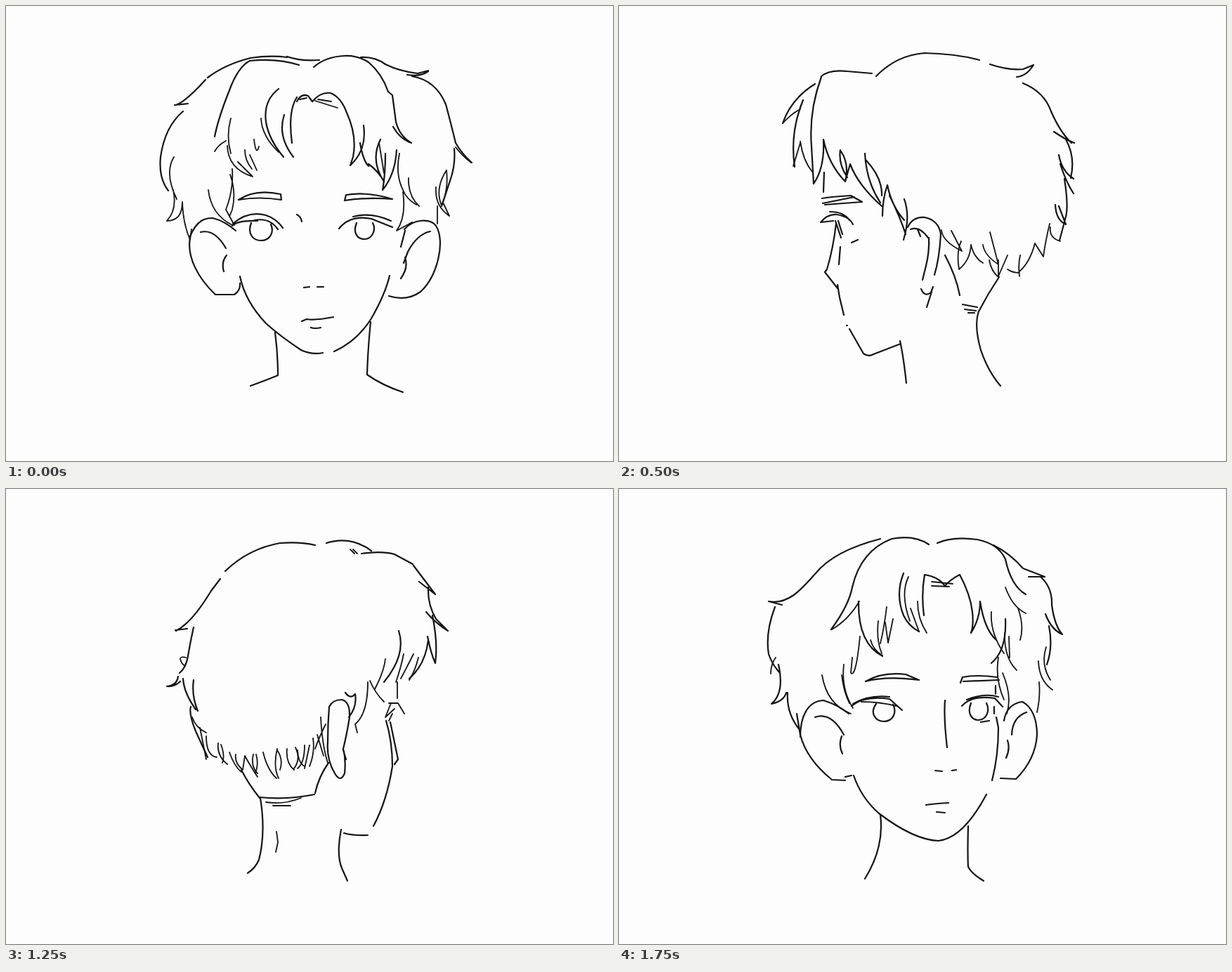
Recreate the animation shown at these times as an HTML page without scripts. Size 864 px wide and 648 px high, loop 1.83 s.

```html
<!DOCTYPE html>
<html lang="en">
<head>
<meta charset="utf-8">
<title>Head turn</title>
<style>
html, body { margin: 0; width: 100%; height: 100%; overflow: hidden; background: #fdfdfd; }
svg { display: block; width: 100vw; height: 100vh; }
path { fill: none; stroke: #141414; stroke-width: 2.2; stroke-linecap: round; stroke-linejoin: round; }
.thin { stroke-width: 1.8; }
.reel > g { visibility: hidden; animation: pose 1830ms step-end calc(var(--t) * 1ms) infinite; }
.reel > g:nth-child(3n) { animation-name: long-pose; }
@keyframes pose { 0% { visibility: visible } 4.3715%, 100% { visibility: hidden } }
@keyframes long-pose { 0% { visibility: visible } 4.918%, 100% { visibility: hidden } }
.flip { transform: translate(862px, 0) scale(-1, 1); }
.flip-back { transform: translate(894px, 0) scale(-1, 1); }
</style>
</head>
<body>
<svg viewBox="0 0 864 648">
<defs>
<g id="front">
  <!-- hair, locks, ears, features, jaw and neck -->
  <path d="M242 141Q256 136 284 105M240 141L259 139M287 102Q312 83 348 74Q376 70 400 73M297 186Q302 160 318 120Q330 87 347 78Q385 74 417 84M400 72Q420 79 446 77M438 87Q455 72 482 71Q500 70 516 80Q535 96 544 122M505 73Q525 72 540 83Q560 93 586 96L601 92M571 98Q590 101 601 93M578 100Q612 106 626 140Q634 170 640 195Q650 212 663 223M638 203Q640 225 633 246L620 285M252 150Q226 172 220 215Q217 245 231 263"/>
  <path class="thin" d="M239 215Q225 238 243 275M238 262Q244 290 229 306Q251 306 251 279Q252 310 262 333L264 318M627 234Q610 260 620 284Q630 262 627 234M612 258Q610 285 631 299L622 280M614 285V310M320 160Q313 185 320 210M315 199Q316 232 351 243L330 222M340 205Q340 220 350 232M347 212L357 234M353 190Q356 215 360 200M363 160Q364 185 388 208M297 207Q302 198 313 192M640 201Q648 212 662 223"/>
  <path d="M388 118Q366 135 370 165Q374 190 395 215M396 155Q386 185 409 215M414 130Q401 150 407 195M414 136Q420 124 430 128L436 136Q448 122 462 124Q477 130 485 152Q500 185 494 215L490 227Q514 205 509 170M504 195Q508 220 516 228M533 190Q518 220 538 250M516 225Q530 235 538 250M540 210Q540 240 536 262Q554 240 556 205M544 122L550 127Q553 150 555 165Q560 185 577 195M551 172Q560 188 574 194"/>
  <path class="thin" d="M418 133L428 131M440 135L472 145M444 133L463 136M531 195L538 238M560 210Q554 240 565 262Q570 275 584 283M573 245Q572 270 588 285M565 265Q570 300 556 320L578 308M288 262Q292 297 322 312M322 232Q324 262 313 290L325 312M319 240Q328 265 322 290L318 300"/>
  <path d="M262 330C257 358 274 388 298 411L325 411Q334 405 333 395M262 328C272 304 284 302 294 302Q311 306 327 320M277 322Q297 317 313 345M314 355Q306 365 310 378M567 318C580 303 604 302 612 313C626 335 614 385 590 407Q570 421 545 413M604 321Q585 325 572 350L566 366M568 358Q573 373 562 388M568 320L562 343"/>
  <path d="M331 276Q355 260 391 268L392 276Q360 271 331 276M482 277L484 269Q515 264 550 275Q515 272 482 277M322 313Q330 305 358 306M323 310Q345 291 370 298Q385 303 394 316M354 305Q375 301 387 318M349 309C343 325 352 334 363 334C376 334 382 322 377 311M474 317Q490 297 520 303L550 315M494 300Q520 293 548 306M499 309C493 324 501 332 510 332C522 332 527 318 522 309M414 297Q420 300 421 307M424 401L432 400M443 400H452M421 449L428 446Q440 448 466 443M434 458Q440 460 448 458"/>
  <path d="M333 385Q340 420 370 452Q390 470 420 490Q435 497 451 494M467 492Q500 477 520 445Q540 410 546 384M383 465Q387 495 387 526Q370 533 348 541M519 450Q515 490 514 525Q535 540 565 550"/>
</g>

<g id="left-quarter">
  <path d="M213 185Q214 150 245 113Q275 82 300 89Q318 93 326 106Q336 82 365 73Q395 70 410 82Q424 98 432 130Q440 160 459 178L422 140M408 80Q425 66 465 70Q515 80 545 93L559 88M542 95L556 93M550 99Q575 115 590 150Q603 185 628 190L600 183M607 190Q624 215 625 272M608 220Q604 245 624 265Q624 245 612 222M598 262L618 264M604 262Q602 300 588 313M589 285Q582 305 589 320L595 338M590 285Q592 300 587 312M583 320Q582 332 594 337M583 318Q582 345 573 360M576 348L575 365Q570 375 556 378"/>
  <path class="thin" d="M213 180Q220 162 246 151M240 157Q224 195 238 220L256 249M246 216Q247 235 257 248M256 195Q258 225 272 244M272 140Q258 165 266 200Q272 230 284 245M278 210Q284 225 294 238M296 156Q315 145 343 152M322 147L337 157M328 147L340 153M397 181Q393 200 403 230M396 185Q406 205 404 212M418 210Q428 230 447 247M479 260L481 300"/>
  <path d="M290 232Q279 175 298 150Q314 132 345 140M345 154Q346 134 351 137Q362 170 356 215L351 237Q372 225 379 200Q385 225 411 242Q400 215 400 205M411 242Q413 215 413 192Q420 225 451 250M444 200Q440 215 447 228Q460 262 474 265M482 260Q483 285 504 317Q514 300 511 275"/>
  <path d="M503 322Q515 302 535 301Q560 305 565 335Q562 375 540 408Q528 422 511 415M539 315Q522 315 522 338Q510 350 511 363L517 362L516 377M293 241Q291 262 291 281L325 279L327 290M292 281L297 286H322M326 292Q337 310 330 335L319 375Q325 395 333 398M344 394L354 393M393 279L399 270Q430 265 470 274Q430 274 393 279M388 327Q395 317 415 320Q440 323 463 319L447 327Q420 332 388 327M398 334L410 336M352 447L381 443L376 446M359 455L372 454"/>
  <path class="thin" d="M297 290L309 308V290M297 325Q301 308 311 310L317 322M297 325Q310 320 325 329M298 328L310 332L313 365M297 337Q301 370 320 393M318 345L313 370M405 291L401 309"/>
  <path d="M322 400Q335 440 352 465Q365 492 380 496Q400 499 430 480L463 462M476 450Q497 440 505 417M399 499Q407 515 410 539M401 516Q395 527 374 539M510 425Q508 470 516 510Q522 535 573 565M513 513L526 535"/>
</g>

<g id="profile">
  <path d="M233 167Q245 132 279 111M262 134Q243 180 250 229M288 101Q270 150 274 200L277 253M288 100Q300 90 325 93L360 96M366 100Q395 70 435 67Q480 68 513 77M528 83Q555 92 575 90L590 84Q580 100 566 101M575 110Q605 122 615 150Q628 180 644 195M619 179Q635 190 648 195M636 190Q650 215 643 245M626 212Q630 235 647 246M628 225Q636 250 647 267M634 246Q640 285 636 300M621 283Q622 305 636 311L626 285M636 300L627 334"/>
  <path class="thin" d="M233 167Q246 153 258 147M258 193Q262 220 275 236M248 228L258 195M614 315Q612 330 628 335M613 310Q607 335 604 357L592 338Q585 365 570 378M570 385Q568 368 571 355M553 375Q560 380 570 380M459 319Q460 335 488 349L473 320M487 335Q480 350 484 375Q500 362 501 340Q505 358 518 366M518 340Q520 355 540 368L528 322M527 362Q530 378 540 386V362M553 355L540 385"/>
  <path d="M277 253Q293 230 291 190Q298 225 322 250M315 205Q312 225 325 244M316 207Q328 225 322 250L329 225Q340 255 374 285M350 210Q352 250 372 280M352 220Q375 245 374 270M375 299Q375 275 382 255Q388 285 406 305M406 275Q415 300 405 333M385 270Q400 300 408 325"/>
  <path d="M292 237L291 265M289 274Q298 272 330 270L346 279M290 281L335 272M293 283L346 279M287 308Q297 296 310 297Q328 300 333 311M300 293Q320 293 328 305M287 308L305 306M308 306L316 330M312 306L318 325M331 337L340 333M309 310Q305 345 296 375L293 379L311 402M315 343L313 368M311 397L314 415L320 440M324 455H325M328 460L348 495Q355 500 362 496L401 481M400 477Q405 500 409 537"/>
  <path d="M464 355Q480 385 485 412M541 386Q525 410 512 435Q505 455 515 490Q525 520 543 541M489 425L510 429M492 432L508 434M497 437H506"/>
</g>
<path id="profile-ear" d="M411 315Q418 300 435 301Q455 305 458 325Q456 360 449 383M415 318Q428 313 440 330M425 318L429 328M441 330Q442 350 437 370L432 390M430 403Q435 415 444 408L447 400M445 407L438 429"/>

<g id="back">
  <path d="M270 248Q285 215 290 180Q300 130 325 107L345 92M352 88Q375 70 398 71Q425 74 441 80Q460 72 490 72Q515 73 530 81Q560 95 607 97Q590 104 568 105M462 91Q490 82 528 77M570 108Q590 110 617 126M602 132Q620 140 626 170Q632 195 649 208M623 190Q635 215 650 225Q660 240 660 260M638 230Q642 240 655 248M638 238Q638 252 641 262Q647 290 642 315"/>
  <path class="thin" d="M428 92L455 93M433 98L457 99M442 103H454M627 245Q632 260 640 265M638 265Q630 275 634 292L643 312M623 290Q620 310 634 322M613 300Q608 320 628 329M610 320Q600 335 617 342M606 322Q606 350 597 357M265 247Q285 240 291 222M268 246L300 240M300 233Q300 270 314 292M287 250Q290 275 310 295M312 240Q312 265 322 300M316 255Q320 275 322 295"/>
  <path d="M342 297Q355 330 380 345M350 325Q360 350 370 362M360 318Q365 345 382 360M380 355Q385 375 400 400M392 340Q385 370 402 398Q412 375 408 350M417 340Q425 370 440 390Q450 370 447 352Q450 372 457 380V350M421 352Q418 365 434 378M462 350Q465 370 475 378V362Q478 375 486 388Q492 370 490 362Q495 380 515 368"/>
  <path class="thin" d="M508 362Q515 380 526 395L522 372M526 416L532 395M535 375Q530 395 540 398M552 368Q540 380 542 395M556 368Q550 385 565 390M570 362Q560 380 570 388M583 350Q575 375 585 380M590 350Q580 355 578 380M602 358Q585 360 588 368"/>
  <path d="M397 457Q401 490 401 525Q396 535 385 543M428 434Q470 441 515 433M523 430Q522 480 531 519M526 425L538 402"/>
  <path class="thin" d="M404 408Q405 428 422 430M440 440H495M463 432L522 428M470 450H484M489 478L495 511"/>
</g>
<path id="back-jaw" d="M352 423Q370 465 388 488L396 492"/>
<path id="back-ear" d="M323 302Q327 298 338 302M333 288L329 300M322 305Q317 340 320 355Q325 380 340 405Q345 414 354 410L347 375M345 308Q342 330 345 345M360 372L354 395"/>

<g id="back-quarter">
  <path d="M242 202Q265 190 292 145L305 128M312 117Q345 85 390 77Q420 75 440 80M456 77Q490 66 520 88M506 92Q535 88 553 93L579 107M580 109Q592 125 611 150L588 132M601 140Q600 165 612 185L629 202Q610 190 598 175M607 180Q615 220 611 248Q605 235 600 210M241 201L258 199M267 197Q262 220 259 238Q256 255 247 262M245 267Q243 280 229 281Q240 282 248 274M252 270Q253 290 270 314M267 272Q264 295 273 316M263 310Q260 320 270 345L287 382"/>
  <path class="thin" d="M490 86L496 92M494 86L500 92M256 240Q248 238 248 242Q250 250 255 252M265 325Q270 340 285 347M276 340L285 385M285 352Q285 380 300 382M302 362Q300 380 315 392M306 364Q312 380 308 390M318 375Q325 395 335 403M327 378Q325 390 337 400L340 380Q350 398 358 410M352 378Q348 395 358 405M356 378Q360 392 355 405M366 375Q372 400 385 412"/>
  <path class="thin" d="M386 370Q380 395 388 412M386 372Q395 385 390 400M400 370Q398 390 410 400M412 368Q420 385 410 398M415 372Q416 390 425 395M425 365Q425 390 415 398M437 355Q440 375 432 395M432 365L425 398M448 325Q450 365 458 390M455 335Q445 355 440 370M443 350L452 380M518 273Q525 290 538 303M515 275Q515 320 497 335L500 347M540 242Q538 260 525 285M566 235Q562 255 555 275M580 235Q570 255 562 270M587 240Q582 260 574 272M557 275V298"/>
  <path d="M559 202Q570 236 538 275M601 215Q597 250 574 270M460 310Q465 300 478 300Q490 303 489 325Q485 350 480 370Q484 385 482 405Q476 419 468 405Q456 385 458 360Q458 335 460 310M483 290Q490 300 497 292Q500 310 488 325M480 372L484 385M541 330Q550 360 550 395Q542 445 523 480M547 332L558 385L553 392M481 490Q495 494 515 493"/>
  <path class="thin" d="M545 305H558L567 320M548 305L540 325L553 313M545 330L550 320M370 446Q395 450 420 440M380 451H405M385 488L387 503L384 517"/>
  <path d="M335 400Q345 420 361 440M459 390Q445 410 440 433M361 439Q400 443 439 435M362 440Q370 490 360 528Q355 540 344 547M477 485Q470 520 478 540L486 558"/>
</g>

<g id="right-quarter">
  <path d="M224 167Q250 163 273 133M224 167Q232 170 238 179M275 129Q296 100 345 86Q385 74 409 74M424 72Q460 80 495 88M480 95Q518 76 537 88Q550 98 555 124L565 140M538 87Q565 72 590 93Q610 115 622 155L632 194Q618 178 612 150M238 191Q226 218 227 240L207 244Q220 238 224 228M219 246Q209 275 213 301Q218 280 228 270M226 276Q230 315 250 345M241 320Q243 345 258 355M249 345Q255 360 270 367"/>
  <path class="thin" d="M268 367Q270 380 258 388Q272 385 277 366M278 370Q285 390 305 393M290 372Q295 395 318 416L306 385M318 416Q328 400 330 375M330 395Q335 405 345 410M345 405L358 372M333 378Q350 375 354 350M338 365Q348 360 350 335M342 410Q338 395 345 380M461 165Q455 182 437 190M437 257Q438 275 450 284M438 262Q439 300 417 325M433 290Q437 305 430 318M427 290Q428 320 411 345Q402 325 405 295"/>
  <path d="M470 110Q462 118 461 155Q452 185 432 194M470 160Q470 198 477 217Q485 235 499 247Q496 210 509 175M474 212Q455 240 447 282M506 206L511 225Q523 195 522 152Q530 190 541 218Q552 185 541 150M527 135Q532 165 545 182M547 152Q550 172 563 187M550 110Q572 150 563 188M561 133Q567 112 575 135M565 137Q575 133 580 147Q592 185 582 208Q575 225 567 235M566 180Q574 200 565 222M587 160Q595 190 605 210M607 165Q608 220 580 263M618 170Q624 210 607 242V215M585 220L586 240"/>
  <path d="M403 314C390 300 372 306 361 320C346 345 358 385 382 406Q392 420 403 411L411 400M400 318Q379 312 379 343Q384 375 398 392M390 322Q402 343 399 358Q389 366 398 378L404 395M403 400L411 385M488 278Q505 261 547 269L556 272L551 279Q515 271 488 278M484 317Q507 297 543 308M490 311Q515 289 537 302L543 307M500 309C494 322 501 330 508 330C516 328 519 316 516 306M529 310L533 320M491 330L503 336M523 338L526 347"/>
  <path d="M563 222V265L553 295Q553 320 562 337L573 366Q580 386 569 392L556 399M548 394L559 390M526 448L545 447M561 403Q558 440 545 470Q538 499 526 498Q500 495 483 488L464 489M466 490Q465 520 450 550Q450 563 459 576M412 421L419 437M325 415L343 435Q351 455 350 480Q347 505 331 536"/>
  <path class="thin" d="M556 292L568 308L575 311M556 310L567 309L560 320M558 315L564 331M345 443H370M347 447L360 449M381 402L372 440"/>
</g>

<g id="near-front">
  <path d="M213 160C240 165 258 145 280 120Q306 88 372 71M213 160L232 165M302 200Q327 166 332 140Q344 88 388 71Q420 65 441 79M453 77Q475 67 510 72Q540 78 550 100Q558 138 579 150M533 80Q557 92 575 113L606 125H583M600 125Q617 140 616 165Q620 195 631 207Q615 200 607 178M612 195Q618 225 609 250M222 168Q208 205 213 235Q218 250 229 262M227 250Q236 290 217 306Q235 302 238 290M240 290Q238 320 258 344M253 320L258 350"/>
  <path class="thin" d="M550 140Q560 168 579 177M608 225Q600 250 614 272M597 245Q598 273 617 286M598 275Q600 295 595 318M223 240Q216 250 216 263M289 265Q296 307 330 320M320 250Q316 285 333 312M317 265Q320 290 328 305M332 240L330 262Q337 270 343 210"/>
  <path d="M258 353C258 325 268 302 291 301Q313 308 327 320M279 325Q302 317 320 350M317 352Q312 365 318 377M258 350Q267 385 303 414L322 415M322 410L331 408M548 330Q552 306 574 303C588 310 595 328 595 350Q593 385 565 413L543 412M580 318Q560 325 559 350M553 358Q557 370 551 383M372 464Q378 510 350 555M497 480Q496 520 497 538Q502 548 519 558"/>
</g>
<g id="near-front-face">
  <path class="thin" d="M303 200Q327 186 342 160M358 215Q362 230 375 237M369 188Q366 215 374 234M381 168Q377 200 372 220M379 190L383 219L390 185M415 170L427 203M412 125Q400 150 414 188M425 160Q425 185 438 205M445 132L475 135M445 138L470 139M530 175Q528 205 548 234M549 205Q548 240 566 258M555 210L556 240M568 170Q577 195 571 215M540 240Q535 270 548 300M546 262Q560 295 552 320"/>
  <path d="M341 160Q340 220 375 238M405 120Q393 150 405 180Q412 195 427 203M434 180Q430 150 435 122Q455 125 464 138Q470 130 485 122Q500 150 503 175Q505 195 501 205Q514 185 514 160Q520 200 537 215M550 185Q552 230 530 248M334 408Q345 440 370 462Q420 500 455 501Q490 497 523 435M531 415Q540 380 540 340L537 325M534 310V320M536 280V292"/>
  <path d="M351 274Q375 260 408 264L427 272Q380 266 351 274M486 276L489 268Q510 264 538 268M490 274L541 272M331 309Q350 294 385 299L403 315M333 306Q355 293 385 296M345 303Q370 303 395 309M366 306C356 320 366 331 377 331C390 331 396 318 390 307M488 309Q503 293 535 298L546 310M495 300Q520 290 540 296M501 305C495 320 502 329 512 329C524 328 528 315 523 305M515 332L527 330M464 301Q462 325 467 368M450 401L460 402M474 401L480 400M437 450Q450 448 469 447M452 460L464 461"/>
</g>

<!-- whole poses, and the same poses turned a little further -->
<g id="near"><use href="#near-front"/><use href="#near-front-face"/></g>
<g id="near-turned"><use href="#near-front"/><use href="#near-front-face" x="20"/></g>
<g id="side"><use href="#profile"/><use href="#profile-ear"/></g>
<g id="side-early"><use href="#profile"/><use href="#profile-ear" x="28"/></g>
<g id="rear"><use href="#back"/><use href="#back-jaw"/><use href="#back-ear"/></g>
<g id="rear-early"><use href="#back"/><use href="#back-jaw" x="-14"/><use href="#back-ear" x="26"/></g>
<g id="rear-late"><use href="#back"/><use href="#back-jaw" x="12"/><use href="#back-ear" x="-14"/></g>
</defs>

<g class="reel">
  <g style="--t:0"><use href="#front"/></g>
  <g style="--t:80"><use href="#near" class="flip"/></g>
  <g style="--t:160"><use href="#near-turned" class="flip"/></g>
  <g style="--t:250"><use href="#left-quarter"/></g>
  <g style="--t:330"><use href="#right-quarter" class="flip"/></g>
  <g style="--t:410"><use href="#side-early"/></g>
  <g style="--t:500"><use href="#side"/></g>
  <g style="--t:580"><use href="#back-quarter" class="flip"/></g>
  <g style="--t:660"><use href="#rear-early"/></g>
  <g style="--t:750"><use href="#rear"/></g>
  <g style="--t:830"><use href="#rear-late"/></g>
  <g style="--t:910"><use href="#back" x="-12"/><use href="#back-ear" x="-36"/><use href="#back-ear" class="flip-back" x="-20"/></g>
  <g style="--t:1000"><use href="#rear-late" class="flip-back"/></g>
  <g style="--t:1080"><use href="#rear" class="flip-back"/></g>
  <g style="--t:1160"><use href="#rear-early" class="flip-back"/></g>
  <g style="--t:1250"><use href="#back-quarter"/></g>
  <g style="--t:1330"><use href="#side" class="flip"/></g>
  <g style="--t:1410"><use href="#side-early" class="flip"/></g>
  <g style="--t:1500"><use href="#right-quarter"/></g>
  <g style="--t:1580"><use href="#left-quarter" class="flip"/></g>
  <g style="--t:1660"><use href="#near-turned"/></g>
  <g style="--t:1750"><use href="#near"/></g>
</g>
</svg>
</body>
</html>
```
